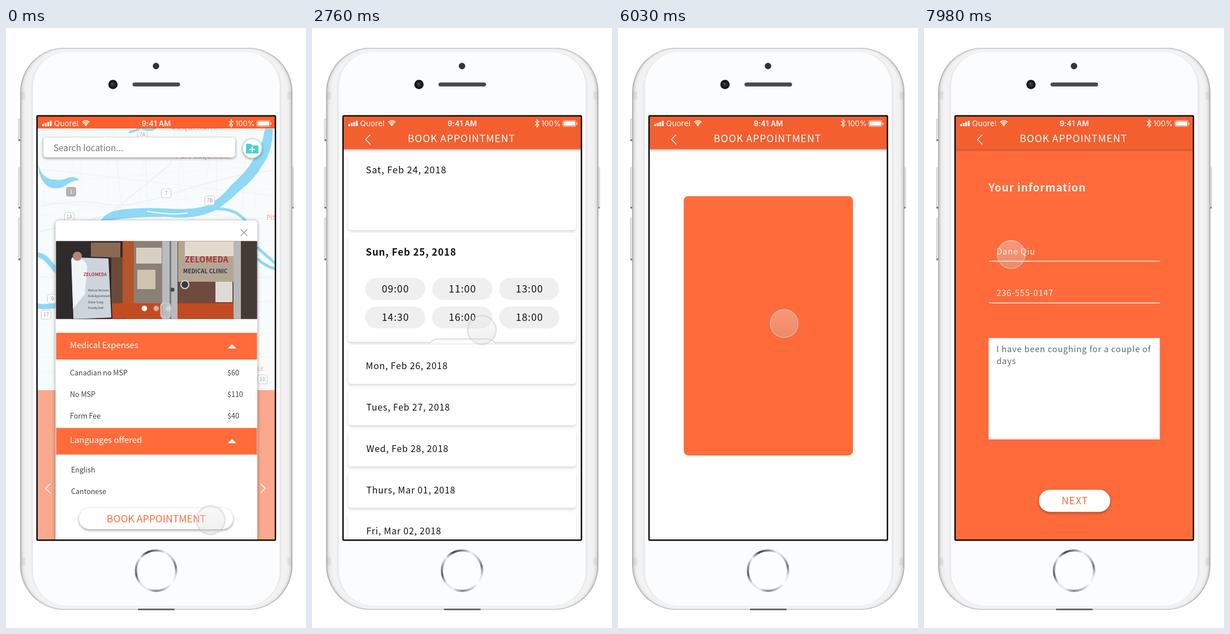
An HTML page with a canvas that plays this animation: 530 px wide and 1057 px high, repeating every 8 s.

```html
<!DOCTYPE html>
<html lang="en">
<head>
<meta charset="utf-8">
<title>Book appointment</title>
<style>
html, body { margin: 0; width: 100%; height: 100%; overflow: hidden; background: #fff; }
canvas { display: block; }
</style>
</head>
<body>
<canvas id="stage" width="530" height="1057"></canvas>
<script>
const W = 530, H = 1057, LOOP = 8000;
const ORANGE = '#ff6b3a', HEADER = '#f45f2f';
const SANS = '"Noto Sans CJK SC","Noto Sans CJK JP",sans-serif';
const UI = 'Inter,Roboto,sans-serif';
const LARGE = 17.6, BODY = 15.8, FIELD = 14.7;
const stage = document.getElementById('stage').getContext('2d');
let g = stage;

// ---------- drawing helpers ----------
function box(x, y, w, h, r, fill, stroke, lw = 1) {
  g.beginPath();
  g.roundRect(x, y, w, h, r);
  if (fill) { g.fillStyle = fill; g.fill(); }
  if (stroke) { g.strokeStyle = stroke; g.lineWidth = lw; g.stroke(); }
}
function disc(x, y, r, fill, stroke, lw = 1) {
  g.beginPath();
  g.arc(x, y, r, 0, 7);
  if (fill) { g.fillStyle = fill; g.fill(); }
  if (stroke) { g.strokeStyle = stroke; g.lineWidth = lw; g.stroke(); }
}
function rect(fill, x, y, w, h) {
  g.fillStyle = fill;
  g.fillRect(x, y, w, h);
}
function line(d, color, lw = 1, fill) {
  const p = new Path2D(d);
  g.strokeStyle = color;
  g.lineWidth = lw;
  g.stroke(p);
  if (fill) { g.fillStyle = fill; g.fill(p); }
}
// y is the middle of the capital letters
function text(s, x, y, size, color, { weight = 400, em = .052, align = 'left', font = SANS } = {}) {
  g.font = `${weight} ${size}px ${font}`;
  g.letterSpacing = em * size + 'px';
  g.textAlign = align;
  g.fillStyle = color;
  g.fillText(s, x + (align === 'center' ? em * size / 2 : 0), y + size * .366);
}
function shadow(alpha, blur, dy, draw) {
  g.save();
  g.shadowColor = `rgba(0,0,0,${alpha})`;
  g.shadowBlur = blur;
  g.shadowOffsetY = dy;
  draw();
  g.restore();
}
function faded(alpha, draw) {
  if (alpha <= 0) return;
  g.save();
  g.globalAlpha *= Math.min(1, alpha);
  draw();
  g.restore();
}
function clipped(x, y, w, h, draw) {
  g.save();
  g.beginPath();
  g.rect(x, y, w, h);
  g.clip();
  draw();
  g.restore();
}
function layer(draw) {
  const c = document.createElement('canvas');
  c.width = W; c.height = H;
  g = c.getContext('2d');
  draw();
  g = stage;
  return c;
}

// ---------- timing helpers ----------
const clamp = v => Math.max(0, Math.min(1, v));
const mix = (a, b, p) => a + (b - a) * p;
const ramp = (t, a, b) => clamp((t - a) / (b - a));
const smooth = p => p * p * (3 - 2 * p);
function spring(t, start) {
  const k = Math.max(0, t - start) * .0128;
  return 1 - (1 + k) * Math.exp(-k);
}

// ---------- phone ----------
function drawPhone() {
  rect('#fff', 0, 0, W, H);
  for (const [x, y, h] of [[22, 160, 39], [22, 246, 72], [22, 335, 74], [504, 246, 72]]) {
    box(x, y, 4, h, 1, '#e8e8e8', '#b0b0b0', .7);
    box(x, y + h - 3, 4, 3, 1, '#777');
  }
  for (let i = 0; i < 22; i++) {
    const v = Math.round(i > 18 ? 240 - (i - 18) * 3 : 243 - 75 * Math.exp(-i / 2.6));
    box(25 + i, 35 + i / 3, 481 - 2 * i, 990 - i / 1.5, 78 - i * .75, `rgb(${v},${v},${v})`);
  }
  box(47.5, 42, 436, 976, 61, '#fafcfe');
  for (const y of [112, 933]) {
    rect('rgba(170,170,170,.22)', 25, y, 9, 14);
    rect('rgba(170,170,170,.22)', 497, y, 9, 14);
  }
  box(233, 1023, 65, 2.5, 1, '#555');
  disc(265, 67, 5.7, '#333');
  disc(189, 99.5, 8.2, '#171717');
  disc(189, 99.5, 4.2, '#2c2c30');
  disc(187.5, 98, 1.3, '#66666e');
  box(223.5, 96, 84, 7, 3.5, '#4a4a4b');
  const ring = g.createConicGradient(-Math.PI / 2, 265, 956);
  ['#888', '#eee', '#ccc', '#777', '#ddd', '#fff', '#c4c4c4', '#888', '#ededed', '#e4e4e4', '#666', '#999', '#f0f0f0', '#444', '#888']
    .forEach((c, i) => ring.addColorStop(i / 14, c));
  disc(265, 956, 35.6, '#fcfdfe', ring, 3.8);
}

// ---------- clinic screen ----------
function shield(s, x, y) {
  box(x - 8.5, y - 8, 17, 16, 4, '#fff', '#cfcfcf', 1.2);
  text(s, x, y, 9, '#999', { em: 0, align: 'center' });
}
function drawMap() {
  rect('#f8fbfc', 56, 156, 419, 745);
  g.lineCap = 'round';
  for (let i = 0; i < 14; i++) {
    const a = 60 + i * 61 % 420, b = 190 + i * 83 % 440;
    line(`M${a} 170l${i % 5 * 8 - 16} 150M56 ${b}l420 ${i % 7 * 16 - 48}`, '#f1f4f5', i % 3 ? .8 : 1.4);
  }
  line('M56 315Q130 300 170 310T300 290T475 250M56 360L180 330L290 240L300 170', '#ebeff0', 1.6);
  const water = '#8fd8f6';
  line('M219 183q12 -2 20 -8q12 8 24 2', water, 4);
  line('M57 243q6 20 22 24q16 2 24 0q14 -8 26 0q-16 3 -24 10q-12 8 -28 3q-17 -8 -20 -37z', water, 1, water);
  line('M168 338q12 -16 40 -18q40 -4 84 -1q42 2 64 -6q26 -14 42 -36q28 -24 40 -46q16 -26 20 -53h13q0 40 -20 66q-14 24 -38 42q-22 22 -46 36q-34 16 -86 10q-56 0 -92 6z', water, 1, water);
  line('M345 320q48 -6 68 10q18 14 22 34l6 20l34 30M446 408q12 12 30 16', water, 5);
  line('M56 399q14 4 24 18l12 14M56 490q18 2 36 -2', water, 9);
  line('M250 323q42 7 70 3', '#f8fbfc', 2);
  box(106, 280, 18, 17, 4, '#b4b4b4');
  text('1', 115, 289, 9, '#fff', { em: 0, align: 'center' });
  [['7A', 241, 188], ['7', 283, 291], ['7B', 360, 304], ['1A', 112, 333], ['9', 82, 477], ['17', 71, 505], ['10', 453, 619]]
    .forEach(a => shield(...a));
  const place = 'rgba(255,120,80,.75)';
  text('Coquitlam', 290, 173, 16, place, { em: .02 });
  text('Port Coquitlam', 300, 225, 13, place, { em: .02 });
  text('Pit', 460, 334, 12, place, { em: 0 });
  text('LE', 444, 601, 9.5, place, { em: .03 });
}
function drawPhoto() {
  clipped(88.5, 375.5, 355, 137, () => {
    rect('#55463f', 88, 375, 356, 138);
    rect('#2f2b2b', 88, 375, 125, 138);
    rect('#8b6a52', 150, 378, 52, 26);
    rect('#6b4a38', 186, 404, 22, 82);
    rect('#b4552c', 206, 375, 20, 112);
    rect('#8a8076', 226, 375, 50, 112);
    rect('#d8d0c2', 230, 387, 45, 28);
    rect('#cfc4b2', 232, 426, 32, 34);
    rect('#c24b22', 186, 485, 218, 28);
    rect('#b9bbbd', 276, 375, 27, 138);
    rect('#777b80', 289, 375, 3, 138);
    rect('#b5a593', 304, 375, 98, 72);
    rect('#e2dacd', 316, 376, 86, 26);
    rect('#6d4b3e', 304, 447, 98, 38);
    rect('#dddbd5', 370, 447, 30, 36);
    rect('#b6b7b8', 402, 375, 13, 138);
    rect('#453b35', 415, 375, 29, 138);
    line('M116 404L181 406L186 510L119 513Z', '#26272c', 4, '#ccd5dc');
    line('M116 407q22 -6 27 14l-4 48l-20 24z', '#e8edf1', 1, '#f1f4f7');
    disc(126, 402, 8, '#b38872');
    line('M274 490v14q0 6 6 6h4q6 0 6 -6v-14q0 -5 -6 -5h-4q-6 0 -6 5z', '#c6c6c6', 3);
    disc(316, 452, 7, '#39393b', '#d8d8d8', 2);
    disc(294, 461, 3.5, '#444');
    const bold = { em: .02, weight: 700 };
    text('ZELOMEDA', 137, 434, 7.5, '#b0303a', bold);
    text('ZELOMEDA', 316, 408, 14, '#a83336', bold);
    text('MEDICAL CLINIC', 313, 428, 9.6, '#27304f', bold);
    ['Walk-ins Welcome', 'Book Appointments', 'Online Today', 'Friendly Staff'].forEach((s, i) =>
      text(s, 145, 462 + i * 10.5, 4.4, '#333', { em: 0 }));
  });
  [244.5, 265.5, 287].forEach((x, i) => disc(x, 494, 4.8, i ? 'rgba(225,225,225,.65)' : '#fff'));
}
function drawClinic() {
  clipped(56, 156, 419, 745, () => {
    drawMap();
    rect('#faa98d', 56, 638, 419, 263);
    rect('#ff5f2b', 56, 156, 419, 21);
    shadow(.45, 5, 1.5, () => box(66, 193, 339, 35, 5, '#fff'));
    text('Search location...', 84, 211.5, 15.3, '#777', { em: 0 });
    shadow(.4, 4, 1.5, () => disc(435, 212, 17.5, '#fff'));
    disc(435, 212, 17, null, '#8bdde2', 1);
    line('M425 205h7l3 3h10v12h-20z', '#4fcfd5', 2, '#4fcfd5');
    line('M435 210v8M431 214h8', '#fff', 2);
    line('M78 803l-8 8l8 8M450 803l8 8l-8 8', '#fff', 1.5);
    shadow(.4, 6, 1, () => box(87.5, 339, 356.5, 590, 6, '#fff'));
    line('M415 355l11 11M426 355l-11 11', '#999', 1.2);
    drawPhoto();
    rect(ORANGE, 88.5, 537, 355, 47);
    rect(ORANGE, 88.5, 704.5, 355, 47);
    const plain = { em: 0, weight: 300 };
    text('Medical Expenses', 113, 559, 14.8, '#fff', plain);
    text('Languages offered', 113, 726, 14.8, '#fff', plain);
    line('M393 564h13l-6.5 -6zM393 731h13l-6.5 -6z', '#fff', 1, '#fff');
    const item = (s, x, y) => text(s, x, y, 12.5, '#404040', plain);
    [['Canadian no MSP', '$60'], ['No MSP', '$110'], ['Form Fee', '$40']].forEach(([s, fee], i) => {
      item(s, 113, 607 + i * 38);
      item(fee, 391, 607 + i * 38);
    });
    item('English', 115, 778);
    item('Cantonese', 115, 816);
    shadow(.38, 5, 2, () => box(129, 846, 272, 37, 18.5, '#fff'));
    text('BOOK APPOINTMENT', 265.5, 864.5, LARGE, ORANGE, { em: 0, align: 'center' });
  });
}

// ---------- booking list ----------
function card(y, h) {
  shadow(.17, 5, 2.5, () => box(64, y, 402.5, h, 5, '#fff'));
}
function raisedNext(y, em) {
  shadow(.36, 5, 2, () => box(203, y - 19.5, 126, 39, 19.5, '#fff'));
  text('NEXT', 266, y, LARGE, ORANGE, { em, align: 'center' });
}
function nextButton(y, active) {
  faded(1 - active, () => {
    box(204, y - 19, 124, 38, 19, '#fff', '#b9b9b9');
    text('NEXT', 264.5, y, LARGE, '#111', { align: 'center' });
  });
  faded(active, () => raisedNext(y, .01));
}
function slots(y, times, picked, active) {
  times.forEach((s, i) => {
    const x = 94 + i % 3 * 118.4, mid = y + 65 + (i / 3 | 0) * 50.3;
    const chip = (fill, ink) => {
      box(x, mid - 19.3, 106, 38.6, 19.3, fill);
      text(s, x + 53, mid, LARGE, ink, { align: 'center' });
    };
    chip('#efefef', '#111');
    if (i === picked) faded(active, () => chip(ORANGE, '#fff'));
  });
}
function drawList(open, active) {
  const satEnd = mix(480, 285, open), sunTop = satEnd + 10, sunText = mix(520, 323, open);
  const wide = { weight: 700 }, slim = { weight: 400 };
  card(222, satEnd - 222);
  text('Sat, Feb 24, 2018', 95, 250, mix(LARGE, BODY, open), '#111', open > .3 ? slim : wide);
  clipped(64, 222, 403, satEnd - 222, () => faded(1 - open * 2, () => {
    slots(249.5, ['09:30', '12:00', '14:00', '16:30'], -1, 0);
    nextButton(445, 0);
  }));
  card(sunTop, 553 - sunTop);
  text('Sun, Feb 25, 2018', 95, sunText, mix(BODY, LARGE, open), '#111', open > .3 ? wide : slim);
  clipped(60, sunTop, 411, 555.5 - sunTop, () => {
    slots(sunText, ['09:00', '11:00', '13:00', '14:30', '16:00', '18:00'], 4, active);
    nextButton(mix(651, 519, open), active);
  });
  ['Mon, Feb 26', 'Tues, Feb 27', 'Wed, Feb 28', 'Thurs, Mar 01', 'Fri, Mar 02'].forEach((day, i) => {
    card(563.5 + i * 72.8, 63.5);
    text(day + ', 2018', i ? 96 : 95, 595.5 + i * 72.8, BODY, '#111');
  });
}

// ---------- form ----------
function drawForm(grow, show, filled) {
  const w = mix(125, 420, grow), h = mix(38, 748, grow);
  box(265.6 - w / 2, mix(519.6, 528, grow) - h / 2, w, h, 19 * (1 - grow), ORANGE);
  faded(show, () => {
    text('Your information', 114, 281, 18.8, '#fff0ea', { weight: 700 });
    rect('rgba(255,255,255,.85)', 115, 410, 302, 1.6);
    rect('rgba(255,255,255,.85)', 115, 483.5, 302, 1.6);
    box(114, 546, 302.5, 178.5, 0, '#fff');
    box(115, 547, 300.5, 176.5, 0, null, '#eeeeee', 2);
    faded(1 - filled, () => {
      text('Name', 128, 393.5, FIELD, 'rgba(255,255,255,.62)');
      text('Phone number', 128, 467, FIELD, 'rgba(255,255,255,.62)');
      text('Reason for appointment', 128, 565.5, FIELD, '#b5b5b5');
      box(204, 814, 124, 37, 18.5, '#fff');
      text('NEXT', 266, 833, LARGE, '#8f8f8f', { em: .01, align: 'center' });
    });
    faded(filled, () => {
      text('Dane Qiu', 128, 393.5, FIELD, '#fff0ea');
      text('236-555-0147', 128, 467, FIELD, '#fff0ea');
      text('I have been coughing for a couple of', 128, 565.5, FIELD, '#666');
      text('days', 128, 587, FIELD, '#666');
      raisedNext(833, .052);
    });
  });
}

// ---------- header, frame, touch ----------
function drawHeader(p) {
  shadow(.3 * p, 4, 1.5, () => rect(p > .05 ? HEADER : '#ff5f2b', 55, 155, 421, mix(22, 58.5, p)));
  faded(p, () => {
    line('M103 188l-8.5 8.5l8.5 8.5', '#fff', 1.3);
    text('BOOK APPOINTMENT', 169, 195, LARGE, '#fff');
  });
}
function drawStatus() {
  for (let i = 0; i < 4; i++) box(64 + i * 4.5, 169 - i * 1.8, 3.2, 4 + i * 1.8, .8, '#fff');
  text('Quorel', 85, 168, 13.3, '#fff', { font: UI, em: .02 });
  g.strokeStyle = '#fff';
  g.lineWidth = 1.9;
  for (const r of [3.6, 6.6, 9.6]) {
    g.beginPath();
    g.arc(141, 173, r, -2.3, -.84);
    g.stroke();
  }
  disc(141, 171.8, 1.3, '#fff');
  text('9:41 AM', 265.5, 168.5, 13, '#fff', { font: UI, em: .01, weight: 600, align: 'center' });
  line('M394 164l7 7l-3.5 3.5v-13l3.5 3.5l-7 7', '#fff', 1.1);
  text('100%', 405, 168, 13, '#fff', { font: UI, em: 0 });
  box(443, 163, 23.5, 10.5, 2.5, null, 'rgba(255,255,255,.7)');
  box(444.5, 164.5, 20.5, 7.5, 1.5, '#fff');
  box(467.5, 166.5, 1.5, 4, 1, 'rgba(255,255,255,.7)');
}

// each move: start, end, x, y
const moves = [[1150, 2250, 300, 532], [3600, 4200, 279, 441], [4860, 5600, 293.5, 520.5], [6600, 7450, 154, 399]];
function drawTouch(t) {
  let x = 361.5, y = 867;
  for (const [a, b, tx, ty] of moves) {
    const p = smooth(ramp(t, a, b));
    x = mix(x, tx, p);
    y = mix(y, ty, p);
  }
  const glow = g.createLinearGradient(0, y - 26, 0, y + 26);
  glow.addColorStop(0, 'rgba(238,238,238,.35)');
  glow.addColorStop(1, 'rgba(205,205,205,.3)');
  disc(x, y, 25.5, glow, 'rgba(0,0,0,.06)', 3);
  disc(x, y, 24.8, null, 'rgba(215,215,215,.6)', 1.6);
}

const phone = layer(drawPhone), clinic = layer(drawClinic);

function draw(now) {
  const t = now % LOOP;
  const page = spring(t, 30), grow = spring(t, 5876);
  g.drawImage(phone, 0, 0);
  clipped(55, 155, 421, 747, () => {
    rect('#fff', 55, 155, 421, 747);
    if (grow < .5) {
      drawList(spring(t, 2592), smooth(ramp(t, 4380, 4720)));
      faded(grow * 2.2, () => rect('#fff', 55, 155, 421, 747));
    }
    faded(grow * 2, () => drawForm(grow, ramp(t, 6200, 6476), smooth(ramp(t, 7600, 7880))));
    if (page < .999) faded(1 - page, () => g.drawImage(clinic, 0, 0));
    drawHeader(page);
    drawStatus();
    drawTouch(t);
  });
  box(54.8, 154.8, 421.2, 747.4, 1.5, null, '#0b0b0b', 2.5);
  requestAnimationFrame(draw);
}
requestAnimationFrame(draw);
</script>
</body>
</html>
```
